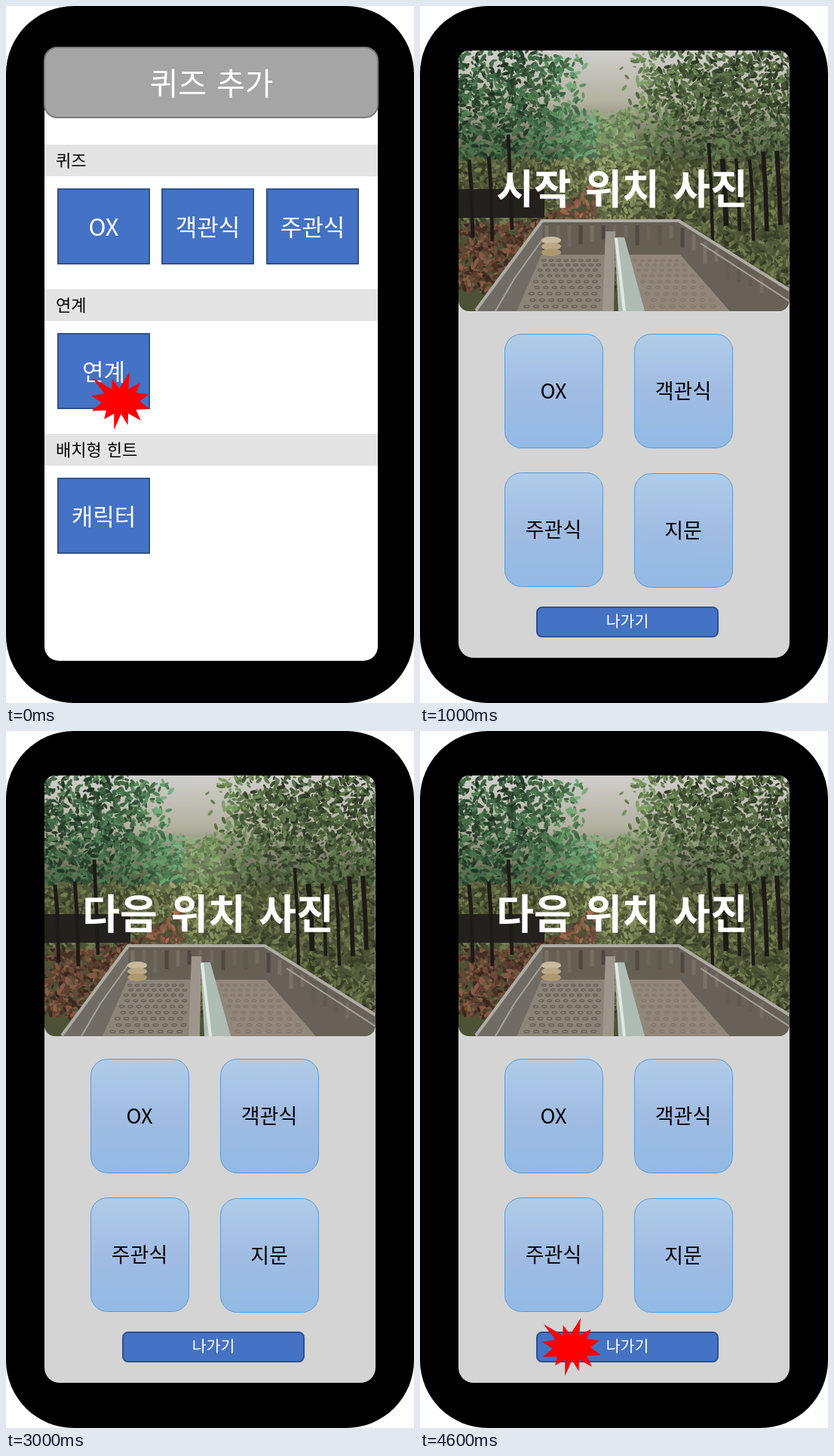
An HTML page with a canvas that plays this animation: 541 px wide and 925 px high, repeating every 5 s.

```html
<!DOCTYPE html>
<html lang="ko">
<head>
<meta charset="utf-8">
<title>퀴즈 추가</title>
<style>
html, body { margin: 0; width: 100%; height: 100%; overflow: hidden; background: #fff; }
canvas { display: block; }
</style>
</head>
<body>
<canvas id="stage" width="541" height="925"></canvas>
<script>
const c = document.getElementById('stage').getContext('2d');
const BLUE = '#4472c4', NAVY = '#2f528f', GREY = '#d9d9d9', PALE = '#e4e4e4';
let seed;
const rnd = () => (seed = seed * 16807 % 2147483647) / 2147483647;
const mix = (a, b, t) => a + (b - a) * t;

// Rounded box given by its outer edges; the border lies inside.
function box(x0, y0, x1, y1, r, fill, border, width = 2) {
  const d = border ? width / 2 : 0;
  c.beginPath();
  c.roundRect(x0 + d, y0 + d, x1 - x0 - 2 * d, y1 - y0 - 2 * d, r);
  c.fillStyle = fill;
  c.fill();
  if (border) {
    c.strokeStyle = border;
    c.lineWidth = width;
    c.stroke();
  }
}

function text(s, x, y, size, color = '#000', weight = 350, align = 'center') {
  c.font = `${weight} ${size}px "Noto Sans CJK KR", "Noto Sans CJK", sans-serif`;
  c.wordSpacing = size * 0.1 + 'px';
  c.textAlign = align;
  c.fillStyle = color;
  c.fillText(s, x, y + size * 0.38);
}

function trace(pts) {
  c.beginPath();
  for (let i = 0; i < pts.length; i += 2) c.lineTo(pts[i], pts[i + 1]);
}

function poly(color, ...pts) {
  trace(pts);
  c.fillStyle = color;
  c.fill();
}

function line(color, width, ...pts) {
  trace(pts);
  c.strokeStyle = color;
  c.lineWidth = width;
  c.stroke();
}

function oval(x, y, rx, ry, turn = 0) {
  c.beginPath();
  c.ellipse(x, y, rx, ry, turn, 0, 7);
}

// Strip of floor or rail that runs from top edge (a0..a1) to bottom edge (b0..b1).
const strip = (color, y0, a0, a1, y1, b0, b1) => poly(color, a0, y0, a1, y0, b1, y1, b0, y1);

// Staggered rings on such a strip.
function rings(rows, cols, width, color, y0, a0, a1, y1, b0, b1) {
  c.strokeStyle = color;
  c.lineWidth = width;
  for (let i = 0; i < rows; i++) {
    const t = ((i + 0.5) / rows) ** 1.15;
    const left = mix(a0, b0, t), step = (mix(a1, b1, t) - left) / cols;
    for (let j = 0; j < cols; j++) {
      oval(left + step * (j + (i % 2 ? 0.7 : 0.3)), mix(y0, y1, t), step * 0.27, step * 0.13);
      c.stroke();
    }
  }
}

function burst(x, y) {
  const spikes = [114, 99, 106, 111, 104, 93, 110, 91, 113, 110, 135, 89];
  const star = spikes.flatMap((tip, i) => [tip, 0].flatMap((r, half) => {
    const a = (29.3 * (i + half / 2) - 73) * Math.PI / 180;
    r ||= 59 + 11 * Math.cos(2 * a);
    return [x + r * 0.36 * Math.cos(a), y + r * 0.355 * Math.sin(a)];
  }));
  poly('#f00', ...star);
}

function clipped(x0, y0, x1, y1, r, paint) {
  c.save();
  c.beginPath();
  c.roundRect(x0, y0, x1 - x0, y1 - y0, r);
  c.clip();
  paint();
  c.restore();
}

// Leaves and ground: hue and lightness follow from the place in the picture.
function foliage() {
  for (let i = 0; i < 9000; i++) {
    const x = 51 + 439 * rnd(), v = rnd(), left = x < 235;
    const gap = Math.exp(-(((x - 245) / 62) ** 2));
    if (v < 0.25 && rnd() < gap * 1.1 || v < 0.07 && rnd() < 0.35) continue;
    const soil = left && v > mix(0.72, 0.55, gap);
    const hue = soil ? 20 : v > 0.45 ? 72 : left ? 125 : 92;
    const light = 29 + 30 * gap * (1 - v) + 26 * (rnd() - 0.5);
    const size = 2 + 4 * rnd();
    oval(x, 59 + 320 * v, size, size * 0.45, rnd() * 3.14);
    c.fillStyle = `hsl(${hue} ${soil ? 32 : 22}% ${light}%)`;
    c.fill();
  }
}

function garden() {
  seed = 77;
  const haze = c.createLinearGradient(0, 59, 0, 210);
  haze.addColorStop(0, '#d0cecb');
  haze.addColorStop(0.45, '#b3b1a0');
  haze.addColorStop(1, '#4b5236');
  box(51, 59, 490, 405, 0, haze);
  foliage();
  box(51, 243, 165, 281, 0, '#24201c');
  for (let i = 0; i < 9; i++) {
    const x = i < 3 ? 68 + 26 * i : 332 + 18 * i;
    line('#1d1a17', 4 + 3 * rnd(), x - 3, 160 + 45 * rnd(), x, 240, x + 2, 290 + 25 * rnd());
  }

  // Sunken concrete ramp
  strip('#8b8479', 328, 160, 246, 405, 128, 243);
  strip('#918679', 328, 270, 346, 405, 297, 411);
  strip('#655f54', 284, 162, 343, 330, 160, 346);
  poly('#716c63', 163, 284, 161, 330, 128, 405, 73, 405);
  poly('#676158', 342, 284, 490, 377, 490, 405, 411, 405, 345, 330);
  for (let i = 0; i < 20; i++) {
    const x = 168 + 15 * i, top = 291 + Math.max(0, x - 343) * 0.63;
    line(`hsl(40 8% ${28 + 16 * rnd()}%)`, 5, x, top, x, top + 15 + 16 * rnd());
  }
  line('#aeaca3', 4, 74, 404, 162, 285, 343, 285, 490, 377);
  line('#a5a39b', 2, 100, 405, 125, 362, 163, 309);
  line('#a5a39b', 2, 372, 315, 490, 392);
  rings(9, 8, 1.3, '#675f56', 335, 162, 240, 403, 136, 239);
  rings(9, 7, 1, '#7a7065', 335, 282, 345, 403, 305, 402);
  strip('#9c968c', 299, 246, 259, 405, 242, 257);
  strip('#aebcb4', 307, 258, 271, 405, 263, 298);
  line('#e1e8e2', 4, 260, 308, 271, 405);
  for (let i = 0; i < 3; i++) {
    oval(174, 311 + i * 8, 13, 5);
    c.fillStyle = `hsl(40 28% ${70 - 7 * i}%)`;
    c.fill();
  }
}

function ramp() {
  box(51, 55, 494, 165, 0, '#978e84');
  strip('#77736b', 55, 51, 119, 165, 51, 75);
  poly('#514c3c', 51, 55, 83, 55, 51, 94);
  line('#3e3b37', 3, 97, 55, 51, 140);
  line('#bbb9b3', 4, 91, 55, 51, 127);
  poly('#777168', 429, 55, 494, 55, 494, 110);
  rings(9, 6, 2, '#58524b', 54, 123, 246, 165, 86, 242);
  rings(8, 6, 2.4, '#665f57', 54, 312, 428, 168, 343, 497);
  strip('#df816a', 101, 102, 181, 136, 89, 174);
  oval(137, 118, 35, 15);
  c.strokeStyle = '#b4483a';
  c.lineWidth = 1.5;
  c.stroke();
  strip('#3c3833', 55, 245, 266, 165, 243, 274);
  strip('#aaa59c', 55, 247, 259, 165, 248, 259);
  strip('#7a857c', 55, 262, 285, 165, 270, 293);
  strip('#b0b8b3', 55, 281, 304, 165, 290, 340);
  line('#c5cec7', 4, 268, 55, 279, 165);
}

function field(x0, y0, x1) {
  const y1 = y0 + 54;
  clipped(x0, y0, x1, y1, 0, () => {
    c.shadowColor = '#aaa';
    c.shadowBlur = 18;
    c.strokeStyle = '#ddd';
    c.lineWidth = 8;
    c.strokeRect(x0 - 4, y0 - 4, x1 - x0 + 8, y1 - y0 + 8);
  });
}

function band(label, y0, y1, size, fill) {
  box(51, y0, 493, y1, 0, fill);
  text(label, 66, (y0 + y1) / 2, size, '#000', 300, 'left');
}

function addScreen() {
  box(51, 55, 493, 869, 19, '#fff');
  box(50, 54, 494, 149, 17, '#a5a5a5', '#7b7b7b');
  text('퀴즈 추가', 272.5, 102, 41, '#fff');
  const rows = [['퀴즈', 'OX', '객관식', '주관식'], ['연계', '연계'], ['배치형 힌트', '캐릭터']];
  rows.forEach(([name, ...tiles], row) => {
    const top = Math.round(184.4 + 192 * row);
    band(name, top, top + 42, 22, PALE);
    tiles.forEach((label, i) => {
      const x = Math.round(68 + 138.4 * i), y = top + 58;
      box(x, y, x + 123, y + 101, 0, BLUE, NAVY);
      text(label, x + 61.5, y + 51, 31, '#fff');
    });
  });
  burst(152, 524.5);
}

function menuScreen(title) {
  box(51, 59, 490, 865, 20, '#d4d4d4');
  box(51, 59, 490, 80, 0, '#000');
  clipped(51, 59, 489.5, 405, 14, garden);
  text(title, 268, 242, 54, '#fff', 700);
  ['OX', '객관식', '주관식', '지문'].forEach((label, i) => {
    const x = 112 + 172 * (i % 2), y = i < 2 ? 435 : 617 + i % 2 + 2;
    const g = c.createLinearGradient(0, y, 0, y + 151);
    g.addColorStop(0, '#b0cce8');
    g.addColorStop(0.5, '#a1bce2');
    g.addColorStop(1, '#92bae5');
    box(x, y, x + 131, y + 152, 22, g, '#5b9bd5', 1);
    text(label, x + 65, y + 75.5, 27, '#000', 300);
  });
  box(154, 797, 396, 838, 7, BLUE, NAVY);
  text('나가기', 275, 816, 20.5, '#fff');
}

function formScreen() {
  box(51, 55, 493, 869, 18, '#fff');
  clipped(51, 55, 494, 165, 16, ramp);
  band('이름', 176, 230, 36, GREY);
  field(63, 243, 417);
  band('문제 내용', 321, 376, 36, GREY);
  field(63, 393, 417);
  band('점수', 478, 532, 36, GREY);
  field(63, 545, 134);
  band('답', 629, 684, 36, GREY);
  const answer = (label, x, fill) => {
    box(x, 696, x + 176.5, 797, 17, fill, '#ae5a21');
    text(label, x + 88, 747, 40, '#fff');
  };
  answer('O', 82, '#c55a11');
  answer('X', 287, '#ed7d31');
}

const scenes = [
  addScreen,
  () => menuScreen('시작 위치 사진'),
  formScreen,
  () => menuScreen('다음 위치 사진'),
  () => { menuScreen('다음 위치 사진'); burst(201, 818); }
];

let shown = -1;
function frame() {
  const now = Math.floor(performance.now() % 5000 / 1000);
  if (now !== shown) {
    shown = now;
    c.clearRect(0, 0, 541, 925);
    box(0, 0, 541, 925, 90, '#000');
    scenes[now]();
  }
  requestAnimationFrame(frame);
}
frame();
</script>
</body>
</html>
```
